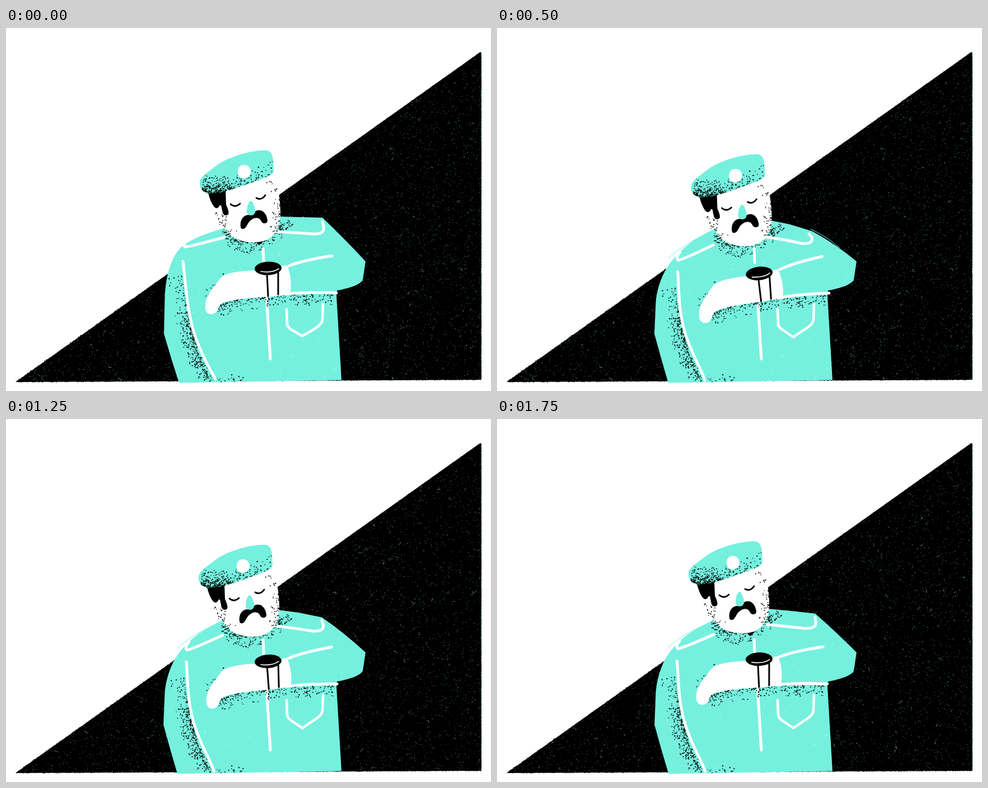
Animation, 866 px wide and 647 px high, one loop 2000 ms. Source, as an HTML page with a canvas:

```html
<!DOCTYPE html>
<html lang="en">
<head>
<meta charset="utf-8">
<title>Checking the time</title>
<style>
html, body { margin: 0; width: 100%; height: 100%; overflow: hidden; background: #fff; }
canvas { display: block; width: 866px; height: 647px; }
</style>
</head>
<body>
<canvas id="stage" width="866" height="647"></canvas>
<script>
const ctx = document.getElementById('stage').getContext('2d');
const TEAL = '#75f0df', BLACK = '#000', WHITE = '#fff';
const STEP = 250;

// One entry per pose: head offset, shoulder drops, shoulder sway, arm angle, grain seed.
const poses = [
  { hx: 0,   hy: 0,   left: 0,  right: 0,  sway: 0,  arm: 0,     grain: 1 },
  { hx: 0,   hy: 4,   left: 11, right: 11, sway: -5, arm: .037,  grain: 2 },
  { hx: .5,  hy: 7,   left: 22, right: 22, sway: -8, arm: .068,  grain: 1 },
  { hx: 0,   hy: 8.5, left: 22, right: 21, sway: -6, arm: .06,   grain: 2 },
  { hx: -1,  hy: 8,   left: 21, right: 17, sway: -3, arm: .042,  grain: 3 },
  { hx: -2,  hy: 6,   left: 20, right: 14, sway: -1, arm: .026,  grain: 4 },
  { hx: -3,  hy: 3,   left: 19, right: 11, sway: 1,  arm: .012,  grain: 3 },
  { hx: -4,  hy: 0,   left: 18, right: 8,  sway: 3,  arm: -.003, grain: 2 }
];

let state = 1;
const seed = n => { state = n * 7919; };
function random() {
  state = (state + 0x6D2B79F5) | 0;
  let t = Math.imul(state ^ (state >>> 15), 1 | state);
  t = (t + Math.imul(t ^ (t >>> 7), 61 | t)) ^ t;
  return ((t ^ (t >>> 14)) >>> 0) / 4294967296;
}
const between = (a, b) => a + random() * (b - a);

function fill(d, color) {
  const path = new Path2D(d);
  ctx.fillStyle = color;
  ctx.fill(path);
  return path;
}

function stroke(d, color, width) {
  ctx.strokeStyle = color;
  ctx.lineWidth = width;
  ctx.stroke(new Path2D(d));
}

function within(path, draw) {
  ctx.save();
  ctx.clip(path);
  draw();
  ctx.restore();
}

// Ink dots that thin out away from a quadratic curve a-b-c in direction (dx, dy).
function shade([ax, ay, bx, by, cx, cy], dx, dy, depth, count, falloff = 2.2) {
  ctx.fillStyle = BLACK;
  for (let i = 0; i < count; i++) {
    const t = random(), u = 1 - t;
    const d = depth * random() ** falloff;
    ctx.fillRect(
      u * u * ax + 2 * u * t * bx + t * t * cx + dx * d + between(-1.5, 1.5),
      u * u * ay + 2 * u * t * by + t * t * cy + dy * d + between(-1.5, 1.5),
      between(1, 2.5), between(1, 2.1));
  }
}

function specks(x0, y0, x1, y1, count, tint) {
  for (let i = 0; i < count; i++) {
    ctx.fillStyle = `rgba(${tint},${between(.15, .8)})`;
    ctx.fillRect(between(x0, x1), between(y0, y1), between(.8, 1.5), between(.8, 1.4));
  }
}

function scratches(x0, y0, x1, y1, count, tint) {
  for (let i = 0; i < count; i++) {
    const x = between(x0, x1), y = between(y0, y1);
    const bend = between(-4, 4);
    stroke(`M${x} ${y}q${bend} ${between(-3, 3)} ${bend + between(-3, 3)} ${between(-5, 5)}`,
      `rgba(${tint},${between(.25, .8)})`, .9);
  }
}

function roughEdge(x0, y0, x1, y1, color) {
  ctx.fillStyle = color;
  const count = Math.hypot(x1 - x0, y1 - y0) / 3;
  for (let i = 0; i < count; i++) {
    const t = random();
    ctx.fillRect(x0 + (x1 - x0) * t + between(-1, 0),
      y0 + (y1 - y0) * t + between(-1, 0), between(.8, 1.5), 1);
  }
}

function drawWedge(p) {
  seed(p.grain);
  const wedge = fill('M17 631L846 43.5Q848 42 849 45L849 627Z', BLACK);
  within(wedge, () => {
    specks(17, 43, 849, 631, 9000, '125,195,184');
    scratches(17, 43, 849, 631, 240, '145,225,212');
  });
  roughEdge(18, 630, 846, 44, BLACK);
  roughEdge(849, 45, 849, 627, TEAL);
  roughEdge(18, 631, 848, 627, BLACK);
}

function drawBody(p) {
  const { left: l, right: r, sway } = p;
  const cornerX = 565 + Math.max(-2, sway), cornerY = 338 + r * 1.1;
  const lean = l / 11;

  if (l > 14) {
    stroke(`M306 ${389 + l}Q332 ${363 + l} 386 361`, TEAL, 1);
  }
  if (r > 16) {
    stroke(`M560 ${cornerY - 4}Q590 ${cornerY + 10} 612 392`, TEAL, 1);
  }

  const body = fill(`M394 356C368 ${362 + l * .2} 335 ${374 + l * .6} ${316 + l * .4} ${388 + l * .65}
    C${298 + l * .25} ${402 + l * .8} ${285 + l * .1} ${436 + l * .7} 283.5 ${482 + l * .3}
    L${282 - lean * .5} 545L${296 - lean} 592L${309 - lean * 1.6} 632.5L450 630L599 627.5L590 476L591 468
    C612 464 632 458 637 449L642 416
    Q${604 + r * .1} ${375 + r * .5} ${cornerX} ${cornerY}
    L522 ${337 + r * .58}L486 ${336 + r * .3}L440 350Z`, TEAL);

  within(body, () => {
    seed(p.grain + 10);
    specks(284, 345, 640, 632, 200, '255,255,255');
    scratches(290, 400, 600, 625, 14, '255,255,255');
    seed(20);
    shade([314 + l * .2, 440 + l, 322, 540, 368 - lean, 627], -1, .15, 26, 170);
    shade([327, 515, 335, 580, 364, 627], -1, .1, 20, 150);
    shade([374, 629, 395, 630, 424, 627], 0, -1, 14, 18);
    ctx.save();
    ctx.translate(p.hx, p.hy);
    shade([386, 360, 435, 402, 492, 346], .05, 1, 24, 210);
    shade([486, 362, 490, 348, 506, 342], .3, .5, 20, 40);
    ctx.restore();
    fill('M444 380L460 380L452 387Z', BLACK);
  });

  const top = 376 + l * 1.08;
  stroke(`M${323 + lean * 2} ${top}Q${315 + lean * 2} ${top + 8} ${319 + lean * 2} ${top + 14}
    Q${328 + lean} ${top + 14} ${390 - lean * 2} ${373 + l * .62}`, WHITE, 5);
  stroke(`M${484 - r * .2} ${363 + r * .42}Q520 ${365 + r * .6} ${548 + sway * .4} ${367 + r * .78}
    Q${570 + sway * .6} ${368 + r * .8} ${567 + sway * .6} ${354 + r * .85}
    L${565 + sway} ${345 + r}`, WHITE, 5);
  stroke(`M${316 + l * .3} ${416 + l * .85}C${321 + l * .2} ${455 + l * .5} 323 510 339 553
    S365 608 ${374 - lean * 1.5} ${626 + lean}`, WHITE, 5);
  stroke('M459 393L460 418M465 478L472 590', WHITE, 5);
  stroke(`M501 501L502 526Q502 533 510 538L529 ${549 + lean}L548 538Q564 529 565 520L566 492`, WHITE, 4.5);
}

function drawHead(p) {
  ctx.save();
  ctx.translate(p.hx, p.hy);
  fill(`M364 290L480 258L484 280Q490 305 490 330C490 356 478 380 447 382
    C420 383 396 373 390 354L386 335Q368 326 364 290Z`, WHITE);

  seed(30);
  shade([486, 290, 494, 330, 480, 364], -1, 0, 16, 38);
  shade([374, 330, 380, 354, 402, 370], 1, -.3, 16, 30, 1.4);
  shade([470, 270, 477, 276, 484, 288], -1, .4, 10, 10);

  fill(`M361 294L392 289L393 315Q400 330 396 333Q390 336 387 330L384 316
    Q382 314 380 319Q375 324 371 318Q365 310 361 294Z`, BLACK);
  const beret = fill(`M346 277C344 266 364 255 380 242C400 229 440 217 465 218
    C478 220 477 235 478 254C477 264 461 267 440 275C415 284 387 295 362 295C350 292 346 286 346 277Z`, TEAL);
  within(beret, () => {
    shade([350, 288, 385, 303, 480, 262], -.05, -1, 28, 300);
    shade([352, 291, 370, 300, 405, 288], 0, -1, 14, 110);
  });
  fill('M425 244C433 244 437 250 437 257C436 264 431 268 425 268C417 268 413 262 414 255C414 248 419 244 425 244Z', WHITE);

  stroke('M401 314Q409 321 418 313M447 303Q456 308 463 298', BLACK, 2.8);
  fill(`M419 355C417 338 428 331 438 334C446 320 464 321 467 343
    C467 349 459 350 456 345C453 337 444 337 438 342C431 346 430 357 424 358Q420 359 419 355Z`, BLACK);
  fill('M436 308Q430 313 430 329Q434 336 442 333Q448 328 443 317Q440 307 436 308Z', TEAL);
  ctx.restore();
}

function drawArm(p) {
  ctx.save();
  ctx.translate(600, 430);
  ctx.rotate(-p.arm);
  ctx.translate(-600, -430);

  seed(40);
  shade([378, 498, 392, 480, 470, 480], .1, 1, 20, 100);
  shade([460, 479, 530, 474, 584, 475], 0, 1, 18, 110);
  shade([358, 484, 364, 466, 392, 442], -.5, -.6, 14, 16);

  fill(`M368 510C358 511 355 503 356 493C358 474 372 461 383 446C392 435 425 432 452 432
    L502 423Q512 450 507 475L470 479C430 481 396 485 385 491C377 497 380 508 368 510Z`, WHITE);
  stroke('M505 424Q530 414 582 406M500 474Q540 470 590 472', WHITE, 5);

  stroke('M466 438L468 478M486 436L486 475', BLACK, 3);
  ctx.fillStyle = BLACK;
  ctx.beginPath();
  ctx.ellipse(468, 428.5, 24, 12, -.04, 0, Math.PI * 2);
  ctx.fill();
  stroke('M455 434Q476 437 487 429', WHITE, 1.7);
  ctx.restore();
}

function render(step) {
  const p = poses[step];
  ctx.fillStyle = WHITE;
  ctx.fillRect(0, 0, 866, 647);
  ctx.lineCap = ctx.lineJoin = 'round';
  drawWedge(p);
  drawBody(p);
  drawHead(p);
  drawArm(p);
}

let shown = 0;
const start = performance.now();
function tick() {
  const step = Math.floor((performance.now() - start) / STEP) % poses.length;
  if (step !== shown) render(shown = step);
  requestAnimationFrame(tick);
}
render(0);
requestAnimationFrame(tick);
</script>
</body>
</html>
```
